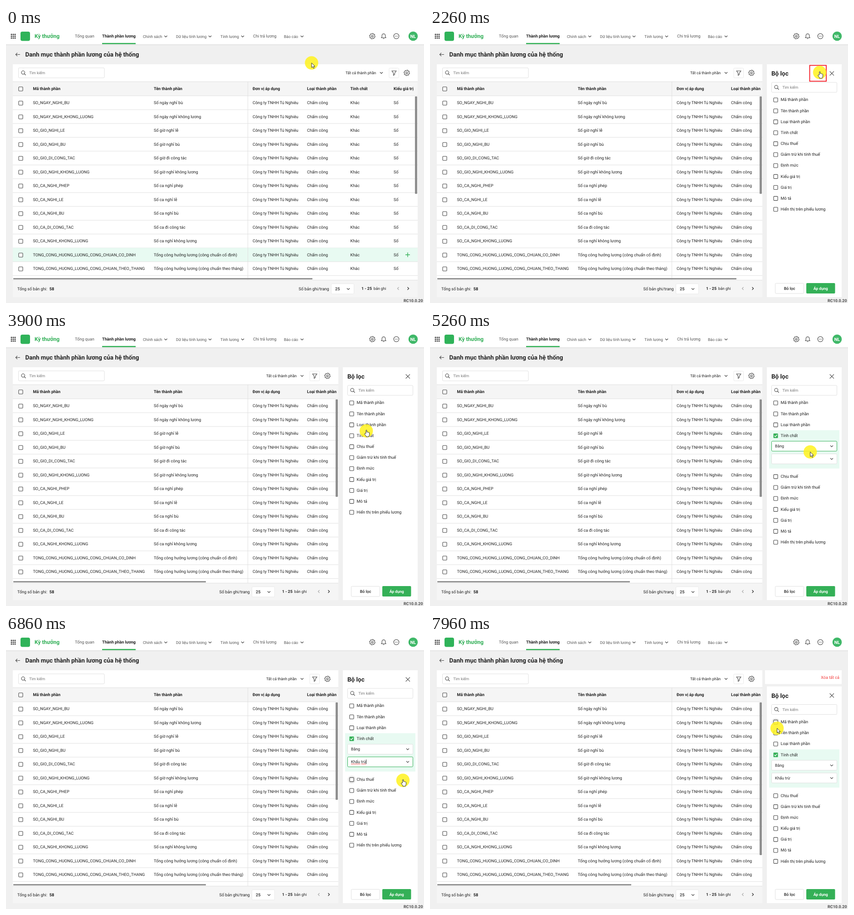
An HTML page that plays this animation: 922x607 px, repeating every 8 s.

```html
<!DOCTYPE html>
<html lang="vi">
<head>
<meta charset="utf-8">
<title>Danh mục thành phần lương</title>
<style>
  html, body { margin: 0; width: 100%; height: 100%; overflow: hidden; background: #f0f0f0; }
  body > svg { display: block; width: 100%; height: 100%; }
  text { font-family: Roboto, sans-serif; text-rendering: geometricPrecision; white-space: pre; }
</style>
</head>
<body>
<svg viewBox="0 0 922 607">
  <g id="page"></g>
  <rect id="marker" x="837.5" y="82.5" width="36.5" height="35" fill="none" stroke="#f5141e" stroke-width="1.8"/>
  <g id="pointer">
    <circle r="14.7" fill="#fff21f" fill-opacity=".86"/>
    <path id="arrow" d="M0 0V10.3L2.4 8.2L4.2 12L6 11.2L4.3 7.5H7.4Z" fill="#fff" stroke="#222" stroke-width=".9"/>
    <path id="hand" d="M-.7 5.8V-1.2Q.3 -2.6 1.3 -1.2V2.6Q2.4 1.8 3.2 3Q4.4 2.2 5.1 3.6Q6.6 2.9 7 4.4V8Q7 10.3 5.6 11.6V13H-.2V11.8L-3.6 7.2Q-3.8 5.2 -2 5.6Z" fill="#fff" stroke="#222" stroke-width=".95"/>
  </g>
</svg>
<script>
const LOOP = 8000;
const GREEN = '#34b057', MINT = '#e8faf2', INK = '#212121', LINE = '#e0e0e0', PALE = '#e9e9e9', GRAY = '#555';
const $ = id => document.getElementById(id);

const CODES = `SO_NGAY_NGHI_BU|Số ngày nghỉ bù
SO_NGAY_NGHI_KHONG_LUONG|Số ngày nghỉ không lương
SO_GIO_NGHI_LE|Số giờ nghỉ lễ
SO_GIO_NGHI_BU|Số giờ nghỉ bù
SO_GIO_DI_CONG_TAC|Số giờ đi công tác
SO_GIO_NGHI_KHONG_LUONG|Số giờ nghỉ không lương
SO_CA_NGHI_PHEP|Số ca nghỉ phép
SO_CA_NGHI_LE|Số ca nghỉ lễ
SO_CA_NGHI_BU|Số ca nghỉ bù
SO_CA_DI_CONG_TAC|Số ca đi công tác
SO_CA_NGHI_KHONG_LUONG|Số ca nghỉ không lương
TONG_CONG_HUONG_LUONG_CONG_CHUAN_CO_DINH|Tổng công hưởng lương (công chuẩn cố định)
TONG_CONG_HUONG_LUONG_CONG_CHUAN_THEO_THANG|Tổng công hưởng lương (công chuẩn theo tháng)`
  .split('\n').map(row => row.split('|'));
const COLUMNS = [[59.5, 'Mã thành phần'], [326, 'Tên thành phần'], [544, 'Đơn vị áp dụng'],
  [664, 'Loại thành phần'], [759.5, 'Tính chất'], [855, 'Kiểu giá trị']];
const SHARED = ['Công ty TNHH Tú Nghiêu', 'Chấm công', 'Khác', 'Số'];
const FILTERS = ['Mã thành phần', 'Tên thành phần', 'Loại thành phần', 'Tính chất', 'Chịu thuế',
  'Giảm trừ khi tính thuế', 'Định mức', 'Kiểu giá trị', 'Giá trị', 'Mô tả', 'Hiển thị trên phiếu lương'];
const OPTIONS = ['Thu nhập', 'Khấu trừ', 'Khác'];

// Drawing helpers; text y is the middle of the capitals.
const text = (x, y, str, { size = 9.1, weight = 400, fill = INK, anchor = 'start' } = {}) =>
  `<text x="${x}" y="${y + size * 0.36}" font-size="${size}" font-weight="${weight}" fill="${fill}" text-anchor="${anchor}">${str}</text>`;
const bold = (x, y, str, opts) => text(x, y, str, { weight: 700, ...opts });
const rect = (x, y, w, h, fill, stroke = 'none', r = 0) =>
  `<rect x="${x}" y="${y}" width="${w}" height="${h}" fill="${fill}" stroke="${stroke}" rx="${r}"/>`;
const circle = (x, y, r, fill, stroke = 'none') =>
  `<circle cx="${x}" cy="${y}" r="${r}" fill="${fill}" stroke="${stroke}" stroke-width="1.1"/>`;
const path = (x, y, d, stroke = '#444', width = 1.1) =>
  `<path transform="translate(${x} ${y})" d="${d}" fill="none" stroke="${stroke}" stroke-width="${width}"/>`;
const hline = (x, y, w) => rect(x, y - 0.5, w, 1, LINE);

const chevron = (x, y) => path(x, y, 'M-3 -1.5L0 1.5L3 -1.5', '#444', 1.2);
const lens = (x, y) => circle(x - 0.8, y - 0.8, 3.7, 'none', '#444') + path(x, y, 'M2 2L5 5');
const funnel = (x, y) => path(x, y, 'M-4.8 -4.8H4.8L1.3 .2V3.3L-1.3 5V.2Z');
const checkbox = (x, y) => `<rect x="${x - 4.5}" y="${y - 4.5}" width="9" height="9" rx="1.2" fill="#fff" stroke="#444" stroke-width="1.1"/>`;
const checked = (x, y) => rect(x - 5, y - 5, 10, 10, GREEN, 'none', 1.2) + path(x, y, 'M-3 0L-.8 2.2L3 -2.2', '#fff', 1.4);
function gear(x, y) {
  const points = Array.from({ length: 32 }, (_, i) => {
    const angle = (i + 0.5) * Math.PI / 16, r = i % 4 < 2 ? 6.2 : 5;
    return `${(r * Math.cos(angle)).toFixed(2)} ${(r * Math.sin(angle)).toFixed(2)}`;
  });
  return path(x, y, `M${points.join('L')}Z`) + circle(x, y, 2, 'none', '#444');
}
const searchBox = (x, y, w) => rect(x, y - 11, w, 22, '#fff', LINE, 2) + lens(x + 11, y) +
  text(x + 23.7, y, 'Tìm kiếm', { size: 8.5, fill: '#757575' });

function navBar() {
  let out = '<rect y="36" width="922" height="2" fill="#e4e4e4"/>' + rect(0, 0, 922, 36, '#fff');
  for (let i = 0; i < 9; i++) out += circle(12 + (i % 3) * 4, 14.2 + Math.floor(i / 3) * 4, 1.35, INK);
  out += rect(32, 8, 21, 20.5, '#2fb359', 'none', 4);
  out += bold(63, 18, 'Kỳ thưởng', { size: 12, fill: '#2fae55' });
  out += text(152, 18, 'Tổng quan', { fill: GRAY }) + bold(212, 18, 'Thành phần lương');
  out += rect(212, 33, 74, 2.6, GREEN) + text(545, 18, 'Chi trả lương', { fill: GRAY });
  for (const [x, label, arrowX] of [[302, 'Chính sách', 352.5], [375, 'Dữ liệu tính lương', 450],
    [473, 'Tính lương', 522], [613, 'Báo cáo', 653]])
    out += text(x, 18.5, label, { size: 8.65, fill: GRAY }) + chevron(arrowX, 18.5);
  out += gear(808, 18);
  out += path(833, 18, 'M-5 3.5H5L3.7 1.5V-1.5Q3.5 -5 0 -5.2Q-3.5 -5 -3.7 -1.5V1.5ZM-1.5 5.5H1.5');
  out += circle(861, 18, 5.8, 'none', '#444') + [-2.5, 0, 2.5].map(d => circle(861 + d, 18, 0.8, '#444')).join('');
  out += circle(898, 18, 10.3, '#3fb868') + bold(898, 18.2, 'NL', { size: 10, fill: '#fff', anchor: 'middle' });
  out += path(26, 58.5, 'M5 0H-4.5M-1 -3.6L-4.6 0L-1 3.6');
  return out + bold(42.5, 58.3, 'Danh mục thành phần lương của hệ thống', { size: 13.45 });
}

function tableCard(s) {
  const width = s.open ? 718 : 893, right = 15 + width, dx = s.open ? -175 : 0;
  let out = `<svg x="15" y="80" width="${width}" height="514" viewBox="15 80 ${width} 514">`;
  out += rect(15, 80, width, 514, '#fff');
  out += searchBox(27.5, 99, 189.5);
  out += text(749 + dx, 99, 'Tất cả thành phần', { size: 8.45 }) + chevron(828 + dx, 99);
  out += rect(845 + dx, 88.5, 21.5, 21.5, '#fff', PALE, 2) + funnel(856 + dx, 99.5) + gear(884 + dx, 99);

  out += rect(15, 118, width, 31.5, '#f5f5f5') + hline(15, 118.5, width) + hline(15, 149.7, width);
  out += checkbox(32.5, 134.5);
  for (const [x, label] of COLUMNS) out += bold(x, 133.3, label, { size: 9.05 });
  CODES.forEach(([code, name], i) => {
    const top = 149.8 + 30.5 * i, y = top + 15.2;
    if (s.rowHover && i === 11) out += rect(15, top, width, 30.5, MINT) + path(886, y, 'M-5 0H5M0 -5V5', GREEN, 1.4);
    out += hline(15, top + 30.5, width) + checkbox(32.5, y + 0.8) + text(59.5, y, code, { size: 9.05 });
    [name, ...SHARED].forEach((cell, c) => out += text(COLUMNS[c + 1][0], y, cell));
  });
  out += rect(533, 118, 1, 438, LINE);
  out += rect(right - 6, 151, 5, (s.applied ? 488 : 366) - 151, '#8f8f8f', 'none', 1);
  out += rect(16, 552, s.scrollEnd - 16, 3, '#929292', 'none', 1);

  out += rect(15, 556, width, 38, '#f5f5f5') + hline(15, 556.5, width);
  out += text(25, 575.3, 'Tổng số bản ghi:', { size: 9 }) + bold(95.7, 575.3, '58');
  out += text(645.5 + dx, 575.5, 'Số bản ghi/trang') + rect(717.5 + dx, 564.5, 50, 22.5, '#fff', PALE, 2);
  out += text(726 + dx, 576, '25', { weight: 500 }) + chevron(755 + dx, 576);
  out += bold(784 + dx, 575.3, '1 - 25', { size: 8.8 }) + text(810.7 + dx, 575.3, 'bản ghi', { size: 8.45 });
  out += path(865 + dx, 575, 'M1.5 -3L-1.5 0L1.5 3', '#aaa', 1.2) + path(887 + dx, 575, 'M-1.5 -3L1.5 0L-1.5 3', '#333', 1.3);
  return out + '</svg>';
}

function filterPanel(s) {
  const dy = s.applied ? 35.6 : 0;
  const select = (y, label, focused) => rect(753.5, y - 11, 144, 22, '#fff', focused ? GREEN : LINE, 2) +
    text(761, y, label, { size: 8.75 }) + chevron(886, y);
  let out = rect(743, 80 + dy, 165, 514 - dy, '#fff');
  if (s.applied) out += rect(739, 80, 169, 30.5, '#fff') + text(903, 95.5, 'Xóa tất cả', { fill: '#f23b3b', anchor: 'end' });
  out += `<g transform="translate(0 ${dy})">`;
  out += bold(753, 100.3, 'Bộ lọc', { size: 13.45 }) + path(886.3, 100.2, 'M-4.6 -4.6L4.6 4.6M-4.6 4.6L4.6 -4.6');
  out += searchBox(753.5, 131, 144);
  if (s.expanded) out += rect(748, 219, 155, 84.5, MINT);
  FILTERS.forEach((label, i) => {
    const y = 158.2 + 24.15 * i + (s.expanded && i > 3 ? 66 : 0);
    if (s.boxHover === i) out += circle(762.5, y + 0.6, 9, '#ececec');
    out += (s.expanded && i === 3 ? checked : checkbox)(762.5, y + 0.6) + text(773.5, y, label);
  });
  if (s.expanded) {
    out += select(254.2, 'Bằng', s.focus === 1) + select(282.2, s.chosen ? 'Khấu trừ' : '', s.focus === 2);
    if (s.chosen && !s.applied) out += path(761, 287, 'M0 0H20.5M22.5 0H33', '#e33', 0.9) + rect(794, 277, 0.9, 10, INK);
  }
  out += '</g>';
  if (s.list) {
    out += '<g style="filter:drop-shadow(0 2px 4px rgba(0,0,0,.2))">' + rect(753.5, 295, 144, 67, '#fff', LINE, 2) + '</g>';
    OPTIONS.forEach((label, i) => out += text(761, 306.5 + 22.2 * i, label, { size: 8.75 }));
  }
  out += rect(761.5, 563.5, 63, 22.5, '#fff', LINE, 2) + text(793, 575, 'Bỏ lọc', { size: 8.8, weight: 500, anchor: 'middle' });
  out += rect(830, 563, 63.5, 23, GREEN, 'none', 2);
  return out + bold(861.7, 575, 'Áp dụng', { size: 8.6, fill: '#fff', anchor: 'middle' });
}

function stateAt(t) {
  return {
    rowHover: t < 30,
    open: t >= 2260,
    expanded: t >= 4630,
    focus: t >= 7100 ? 0 : t >= 5500 ? 2 : 1,
    list: t >= 5830 && t < 6860,
    chosen: t >= 6860,
    applied: t >= 7100,
    boxHover: t >= 7860 ? 0 : t >= 6860 && t < 7100 ? 4 : -1,
    scrollEnd: t < 2400 ? 676 : t < 3000 || t >= 7100 ? 444 : 441
  };
}

// Pointer moves: start, end, from, control, to, ease-out power.
const MOVES = [
  [1170, 1800, [674, 77], [767, 68], [859.5, 98], 1],
  [3470, 4260, [859.5, 98], [847, 216], [763, 231], 2],
  [5070, 5500, [763, 231], [815, 258], [875, 282], 2],
  [6300, 6800, [875, 282], [878, 302], [875.5, 323], 2],
  [7200, 7860, [875.5, 323], [800, 280], [763, 193], 2],
  [7900, 7960, [763, 193], [764, 200], [765.5, 208], 1]
];
function pointerAt(t) {
  const [start, end, from, control, to, power] = MOVES.findLast(m => t >= m[0]) || MOVES[0];
  const u = Math.min(1, Math.max(0, (t - start) / (end - start)));
  const k = 1 - (1 - u) ** power;
  return from.map((p, i) => (1 - k) ** 2 * p + 2 * k * (1 - k) * control[i] + k * k * to[i]);
}
const isHand = t => (t >= 1770 && t < 5100) || (t >= 6450 && t < 7200);

let shownKey;
function render(now) {
  const t = now % LOOP;
  const state = stateAt(t), key = JSON.stringify(state);
  if (key !== shownKey) {
    shownKey = key;
    $('page').innerHTML = rect(0, 0, 922, 607, '#f0f0f0') + navBar() + tableCard(state) +
      (state.open ? filterPanel(state) : '') + bold(877, 602, 'RC10.0.20', { size: 9, fill: '#4a4a4a' });
  }
  $('marker').setAttribute('opacity', t < 2400 ? Math.min(1, t / 830) : 0);
  $('pointer').setAttribute('transform', `translate(${pointerAt(t).join(' ')})`);
  $('hand').style.display = isHand(t) ? '' : 'none';
  $('arrow').style.display = isHand(t) ? 'none' : '';
}

const startTime = performance.now();
function tick() {
  render(performance.now() - startTime);
  requestAnimationFrame(tick);
}
tick();
</script>
</body>
</html>
```
